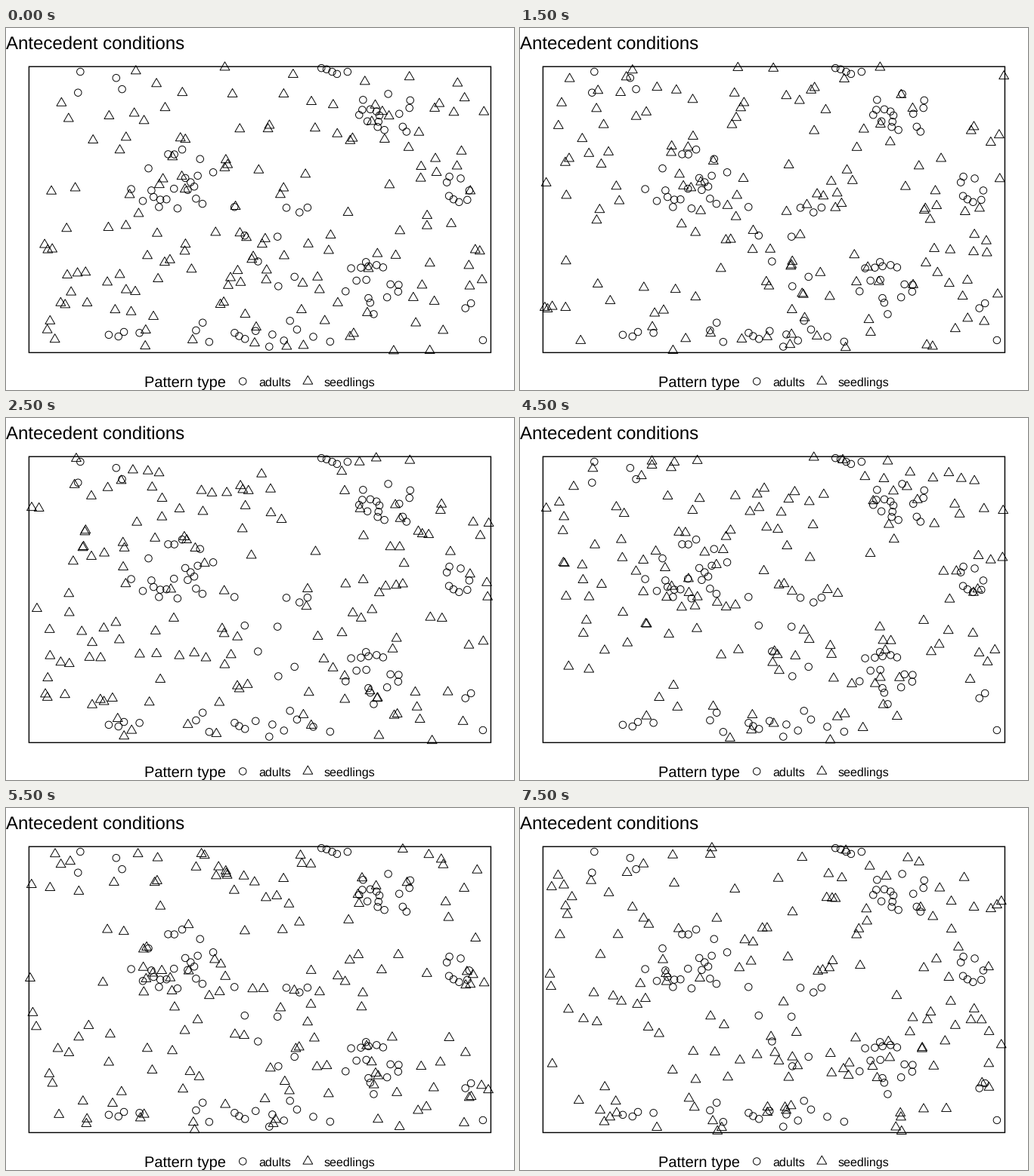
A matplotlib script that plays this animation: 672 px wide and 480 px high, repeating every 8 s.

```python
import numpy as np
import matplotlib.pyplot as plt
from matplotlib.animation import FuncAnimation
from matplotlib.collections import EllipseCollection, PolyCollection
from matplotlib.patches import Rectangle

W, H, DPI = 672, 480, 96
PX = 72 / DPI                      # one pixel in points
LEFT, RIGHT, TOP, BOTTOM = 30.4, 641.4, 51.2, 430.4
RADIUS, STROKE = 4.74, 0.95
SEEDLINGS, SEED = 155, 40
MIN_GAP = 6.5                      # closest distance between two adults
INTERVAL, FRAMES = 500, 16

plt.rcParams["font.family"] = "Liberation Sans"
plt.rcParams["text.hinting"] = "none"

# Stands of adults: count, centre x and y, half-width, half-height
STANDS = [
    (4, 112, 74, 46, 20),
    (5, 421, 57, 40, 5),
    (16, 505, 115, 48, 34),
    (22, 221, 205, 62, 46),
    (8, 604, 207, 25, 25),
    (9, 345, 268, 60, 80),
    (16, 482, 346, 38, 40),
    (14, 343, 402, 105, 27),
    (4, 158, 406, 23, 11),
    (3, 622, 392, 19, 38),
]

angles = np.radians([-90, 30, 150])
TRIANGLE = 1.5551 * RADIUS * np.column_stack([np.cos(angles), np.sin(angles)])


def triangles(points):
    return np.asarray(points)[:, None, :] + TRIANGLE


def scatter_adults():
    """Fill each elliptic stand at random, keeping the plants apart."""
    rng = np.random.default_rng(SEED)
    plants = []
    for count, x, y, half_w, half_h in STANDS:
        goal = len(plants) + count
        while len(plants) < goal:
            r, turn = np.sqrt(rng.random()), 2 * np.pi * rng.random()
            px = x + half_w * r * np.cos(turn)
            py = y + half_h * r * np.sin(turn)
            if all(np.hypot(px - a, py - b) > MIN_GAP for a, b in plants):
                plants.append((px, py))
    return plants


def scatter_seedlings(step):
    """Complete spatial randomness: a fresh uniform pattern per step."""
    rng = np.random.default_rng(SEED + 1 + step)
    return rng.uniform((LEFT, TOP), (RIGHT, BOTTOM), (SEEDLINGS, 2))


fig = plt.figure(figsize=(W / DPI, H / DPI), dpi=DPI, facecolor="white")
ax = fig.add_axes([0, 0, 1, 1])
ax.set(xlim=(0, W), ylim=(H, 0))
ax.axis("off")

style = dict(facecolors="none", edgecolors="black", linewidths=STROKE * PX)


def add_circles(points):
    size = np.full(len(points), 2 * RADIUS)
    ax.add_collection(EllipseCollection(
        size, size, np.zeros(len(points)), units="x", offsets=points,
        offset_transform=ax.transData, **style), autolim=False)


def add_triangles(points):
    shapes = PolyCollection(triangles(points), **style)
    ax.add_collection(shapes, autolim=False)
    return shapes


def label(x, y, text, px):
    ax.text(x, y, text, fontsize=px * PX, color="black", va="baseline")


add_circles(scatter_adults())
seedlings = add_triangles(scatter_seedlings(0))
ax.add_patch(Rectangle((LEFT, TOP), RIGHT - LEFT, BOTTOM - TOP, fill=False,
                       edgecolor="black", linewidth=1.42 * PX, snap=False))

label(0, 28, "Antecedent conditions", 24)
label(183.3, 476, "Pattern type", 20)
add_circles([(313.2, 468.5)])
label(334.7, 475, "adults", 16)
add_triangles([(399.3, 468.5)])
label(420.3, 475, "seedlings", 16)


def update(frame):
    # The first pattern is held for half as long as the others
    seedlings.set_verts(triangles(scatter_seedlings((frame + 1) // 2)))
    return [seedlings]


anim = FuncAnimation(fig, update, frames=FRAMES, interval=INTERVAL,
                     repeat=True, repeat_delay=0, blit=False)
plt.show()
```
